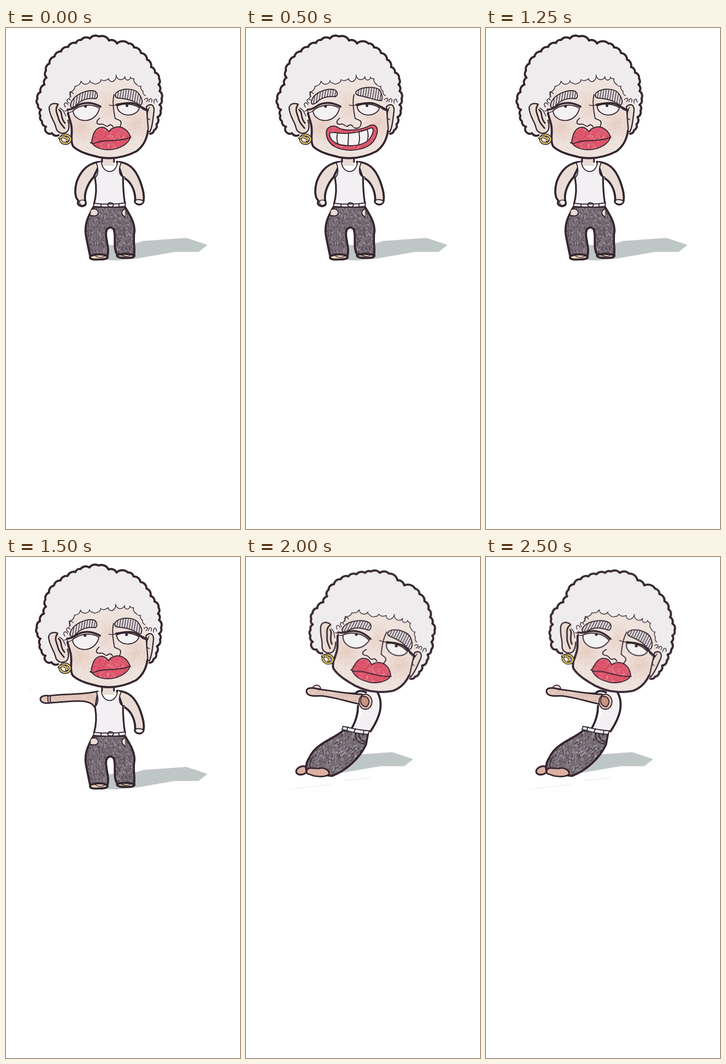
An HTML page for the animation above (2750 ms loop, 468 px wide and 1000 px high).

```html
<!DOCTYPE html>
<html lang="en">
<head>
<meta charset="utf-8">
<title>Cartoon dance</title>
<style>
html, body { margin: 0; width: 100%; height: 100%; overflow: hidden; background: #fff; }
svg { display: block; width: 100%; height: 100%; }
.ink { fill: none; stroke: #35262f; stroke-linecap: round; stroke-linejoin: round; stroke-width: 2; }
.bold { stroke-width: 4.2; }
.fine { stroke-width: 1.5; }
.skin { fill: #e9dcd4; }
.tan { fill: #e0c6ba; }
.foot { fill: #dcb0a3; }
.shirt { fill: #f2f0f2; }
.jeans { fill: #766c74; }
.red { fill: #dc566c; }
.white { fill: #f4f1f2; }
.gold { fill: none; stroke: #e2cb62; stroke-width: 2.6; }

.step { animation: 2750ms step-end infinite; }
#head { animation-name: head; }
#shadow { animation-name: shadow; }
#lips { animation-name: lips; }
#grin { animation-name: grin; }
#browsDown { animation-name: browsDown; }
#browsUp { animation-name: browsUp; }
#upright { animation-name: upright; }
#armDown { animation-name: armDown; }
#armOut { animation-name: armOut; }
#leanNear { animation-name: leanNear; }
#leanFar { animation-name: leanFar; }

@keyframes head {
  0% { transform: none; }
  54.54% { transform: translate(-1px, 0); }
  63.63%, 81.81% { transform: translate(224.5px, 165px) rotate(16.3deg) scale(1, .965) translate(-200.5px, -154px); }
  72.72%, 90.9%, 100% { transform: translate(261px, 164.5px) rotate(17deg) scale(1, .97) translate(-200.5px, -154px); }
}
@keyframes shadow {
  0% { transform: none; }
  63.63%, 81.81% { transform: translate(-32px, -10px); }
  72.72%, 90.9%, 100% { transform: translate(-68.5px, -29.5px); }
}
@keyframes lips { 0%, 45.45% { opacity: 1; } 9.09% { opacity: 0; } 100% { opacity: 1; } }
@keyframes grin { 0%, 45.45% { opacity: 0; } 9.09% { opacity: 1; } 100% { opacity: 0; } }
@keyframes browsDown { 0%, 27.27%, 45.45%, 100% { opacity: 1; } 18.18%, 36.36% { opacity: 0; } }
@keyframes browsUp { 0%, 27.27%, 45.45%, 100% { opacity: 0; } 18.18%, 36.36% { opacity: 1; } }
@keyframes upright { 0% { opacity: 1; } 63.63%, 100% { opacity: 0; } }
@keyframes armDown { 0% { opacity: 1; } 54.54%, 100% { opacity: 0; } }
@keyframes armOut { 0%, 63.63%, 100% { opacity: 0; } 54.54% { opacity: 1; } }
@keyframes leanNear { 0%, 72.72%, 90.9%, 100% { opacity: 0; } 63.63%, 81.81% { opacity: 1; } }
@keyframes leanFar { 0%, 81.81% { opacity: 0; } 72.72%, 90.9%, 100% { opacity: 1; } }
</style>
</head>
<body>
<svg viewBox="0 0 468 1000" preserveAspectRatio="none">
  <defs>
    <pattern id="hatch" width="5" height="6" patternUnits="userSpaceOnUse" patternTransform="rotate(9)">
      <rect width="5" height="6" fill="#e6e1e4"/>
      <path d="M2 0V6" stroke="#35262f" stroke-width="1.5"/>
    </pattern>
    <radialGradient id="blush">
      <stop offset="0" stop-color="#d9a78f" stop-opacity=".36"/>
      <stop offset="1" stop-color="#d9a78f" stop-opacity="0"/>
    </radialGradient>
    <path id="jeans0" d="M175 357C163 378 155 395 161 420C164 435 166 445 168 454L203 455C207 440 200 425 200 410C200 395 216 394 217 408C219 425 215 440 222 452L256 454C259 440 253 425 257 405C257 385 245 370 238 357Z"/>
    <path id="jeans1" d="M181 350C168 376 147 395 145 430L193 448C200 415 231 398 234 374C235 362 234 352 233 349Z"/>
    <path id="jeans2" d="M195 346C172 365 140 372 127 400C119 412 119 422 122 431L172 437C203 425 228 400 240 374L244 352Z"/>
    <path id="lipShape" d="M171 229C174 210 178 199 192 198C200 198 203 204 206 207C210 199 222 196 230 198C240 201 247 210 249 218C245 232 225 243 205 243C190 243 178 238 171 229Z"/>
    <path id="grinShape" d="M161 213C158 196 175 192 186 200C205 208 235 202 249 194C262 191 265 203 261 214C255 235 235 243 210 244C185 244 164 235 161 213Z"/>
    <path id="armShape" d="M184 268C150 276 120 272 86 277C75 275 67 279 69 286C73 293 82 292 90 291L130 288C160 286 174 290 178 302Z"/>
    <path id="armNear" d="M216 276C190 273 150 272 124 273C114 270 104 273 105 280C106 287 117 286 126 285C160 288 185 294 214 300Z"/>
    <path id="armFar" d="M232 274C205 274 175 267 145 264C135 260 122 260 121 267C120 278 135 278 150 277C180 280 205 290 230 294Z"/>
    <clipPath id="jeans0Clip"><use href="#jeans0"/></clipPath>
    <clipPath id="jeans1Clip"><use href="#jeans1"/></clipPath>
    <clipPath id="jeans2Clip"><use href="#jeans2"/></clipPath>
    <clipPath id="lipClip"><use href="#lipShape"/></clipPath>
    <clipPath id="grinClip"><use href="#grinShape"/></clipPath>
    <clipPath id="armClip"><use href="#armShape"/></clipPath>
    <clipPath id="armNearClip"><use href="#armNear"/></clipPath>
    <clipPath id="armFarClip"><use href="#armFar"/></clipPath>
    <clipPath id="faceClip"><path id="faceClipPath"/></clipPath>
  </defs>

  <path id="shadow" class="step" fill="#bfc7c6" d="M200 434L262 429L275 425L361 419L403 433L385 447L338 447L262 460L220 464L195 463Z"/>

  <g id="upright" class="step">
    <path class="skin" d="M192 258H217V275H192Z"/>
    <path class="ink skin bold" d="M222 267C245 268 258 280 268 305C275 325 277 335 275 346C272 354 262 354 258 347C260 330 252 305 233 298Z"/>
    <path class="ink white" d="M260 343C266 342 272 343 275 346C273 353 262 353 258 347Z"/>
    <g id="armDown" class="step">
      <path class="ink skin bold" d="M190 267C165 268 150 285 142 305C137 322 137 338 145 345C140 353 151 358 157 354C162 351 158 346 158 342C157 330 162 312 175 298Z"/>
      <path class="ink fine white" d="M147 347C150 341 158 343 159 349C156 356 148 355 147 347Z"/>
    </g>
    <g id="armOut" class="step">
      <use href="#armShape" class="tan"/>
      <g clip-path="url(#armClip)" data-box="70 268 112 32" data-count="90" data-tilt="-.1" data-tones="#f1e5de #cfa797"></g>
      <use href="#armShape" class="ink" style="stroke-width:3"/>
      <path class="ink" d="M84 277C83 284 84 288 85 291M89 277C88 284 88 288 90 291"/>
      <circle cx="48" cy="265" r=".8" fill="#aaa"/>
    </g>
    <path class="shirt" d="M181 270L191 267C193 290 221 293 223 267L230 270C223 285 228 298 237 297C234 315 235 333 238 351L177 351C181 332 178 315 176 299C185 294 185 282 181 270Z"/>
    <path class="ink" d="M181 270C186 284 184 297 176 299M230 270C223 285 228 298 237 297M191 268C193 291 220 294 223 268"/>
    <path class="ink" style="stroke-width:3.5" d="M178 299C181 315 181 334 176 351M234 298C234 317 235 333 238 351M192 260V267M216 260V267"/>
    <use href="#jeans0" class="jeans"/>
    <g clip-path="url(#jeans0Clip)" data-box="155 355 105 102" data-count="900" data-tilt="1.2" data-tones="#b3a8b0 #463b44 #8f8594 #5b4a52"></g>
    <use href="#jeans0" class="ink bold"/>
    <path class="ink skin" d="M170 363C178 358 186 364 184 371C180 377 174 375 169 374M238 361C230 364 229 372 238 377"/>
    <path class="ink white" d="M176 350C195 352 220 352 239 349L238 356C220 358 195 358 175 356Z"/>
    <path class="ink" d="M190 351V356M226 351V356M203 352C207 346 215 349 215 354C212 359 204 358 203 352"/>
    <path class="ink bold" style="fill:#e6d3b8" d="M169 455C178 451 195 450 203 456C205 461 195 462 185 462C173 463 165 461 169 455ZM222 453C232 450 248 450 257 454C257 459 247 459 239 459C229 459 221 458 222 453Z"/>
    <path class="ink fine" d="M178 454C184 459 192 459 198 455M230 453C237 457 244 457 250 453"/>
  </g>

  <g id="leanNear" class="step">
    <path class="ink skin" style="stroke-width:3" d="M200 267L126 262C116 259 106 260 104 265C104 271 110 272 126 272L205 278Z"/>
    <path class="shirt" d="M200 266L238 268C247 290 246 320 233 348L183 346C198 330 200 315 192 302Z"/>
    <path class="ink bold" d="M238 269C247 290 246 320 234 346M194 299C201 315 194 334 183 346M191 268C202 265 214 266 221 273"/>
    <use href="#armNear" class="tan"/>
    <g clip-path="url(#armNearClip)" data-box="104 270 112 32" data-count="90" data-tilt=".1" data-tones="#f1e5de #c99c8b"></g>
    <use href="#armNear" class="ink" style="stroke-width:3"/>
    <path class="ink fine" d="M122 262C118 267 120 270 123 272M124 273C120 278 122 282 126 285M187 264V273"/>
    <ellipse class="ink" style="fill:#ad705b" cx="218" cy="289" rx="12" ry="14"/>
    <path class="ink" style="fill:#c89480" d="M214 278C222 279 225 290 217 298C208 297 206 284 214 278Z"/>
    <ellipse class="ink foot" style="stroke-width:3" cx="130" cy="436" rx="13" ry="8" transform="rotate(12 130 436)"/>
    <use href="#jeans1" class="jeans"/>
    <g clip-path="url(#jeans1Clip)" data-box="142 348 95 103" data-count="900" data-tilt="1.9" data-tones="#bdb4b9 #41363e #8f98a8 #76585f"></g>
    <use href="#jeans1" class="ink" style="stroke-width:3.5"/>
    <path class="ink" d="M208 354C207 369 216 378 223 378M213 354C213 365 218 371 224 373M182 355C183 374 164 402 157 425"/>
    <path class="ink white" d="M179 344C198 347 218 346 237 347L236 353C218 351 196 352 177 349Z"/>
    <path class="ink" d="M190 344L188 351M204 344L202 351M224 345V352"/>
    <path class="ink foot" style="stroke-width:3" d="M139 439C138 428 152 430 161 434C172 431 183 438 180 446C173 452 156 451 148 446C142 446 139 443 139 439Z"/>
    <path class="ink" style="stroke-width:3" d="M180 450C187 452 193 449 194 445"/>
  </g>

  <g id="leanFar" class="step">
    <path class="ink skin" d="M133 262C136 253 149 254 149 263Z"/>
    <path class="shirt" d="M224 267L262 268C275 290 271 315 249 350L210 344C227 330 232 315 230 300Z"/>
    <path class="ink bold" d="M262 268C275 290 271 315 249 348M224 297C224 315 219 329 212 341M219 273C223 266 232 266 240 270"/>
    <use href="#armFar" class="tan"/>
    <g clip-path="url(#armFarClip)" data-box="120 260 112 36" data-count="90" data-tilt=".2" data-tones="#f1e5de #c99c8b"></g>
    <use href="#armFar" class="ink" style="stroke-width:3.2"/>
    <path class="ink" d="M150 264C180 269 202 273 222 271"/>
    <ellipse class="ink" style="fill:#dbbcae" cx="239" cy="289" rx="13" ry="15"/>
    <path class="ink" style="fill:#c89480" d="M232 278C246 277 250 290 241 299C230 298 226 288 232 278Z"/>
    <ellipse class="ink foot" style="stroke-width:3.5" cx="112" cy="426" rx="12" ry="8" transform="rotate(-18 112 426)"/>
    <use href="#jeans2" class="jeans"/>
    <g clip-path="url(#jeans2Clip)" data-box="115 344 132 97" data-count="1000" data-tilt="2.2" data-tones="#bdb4b9 #382d35 #8f98a8 #76585f"></g>
    <use href="#jeans2" class="ink bold"/>
    <path class="ink" d="M219 349C217 363 225 373 236 373M226 352C226 362 230 367 237 368M134 398C127 407 127 415 129 422"/>
    <path class="ink white" d="M194 338C211 342 230 346 247 347L244 354C227 353 210 350 192 344Z"/>
    <path class="ink" d="M204 339L201 347M219 343L216 350M236 346L234 354"/>
    <path class="ink foot" style="stroke-width:3" d="M121 428C122 417 137 423 146 422C157 419 168 426 166 434C156 441 136 438 128 434C123 434 121 431 121 428Z"/>
    <path fill="none" stroke="#eeeeee" stroke-width="1.5" d="M87 464L170 454M196 446L250 441"/>
  </g>

  <g id="head" class="step">
    <path id="hairFill" fill="#efecee"/>
    <path id="face" fill="#eee2dd"/>
    <g clip-path="url(#faceClip)">
      <ellipse cx="150" cy="198" rx="40" ry="34" fill="url(#blush)"/>
      <ellipse cx="262" cy="190" rx="36" ry="36" fill="url(#blush)"/>
      <ellipse cx="204" cy="155" rx="24" ry="40" fill="url(#blush)" opacity=".7"/>
      <g opacity=".6" data-box="130 170 52 70" data-count="110" data-tilt="1.6" data-tones="#e4c6b7 #f3e9e4"></g>
      <g opacity=".6" data-box="234 165 52 72" data-count="110" data-tilt="1.6" data-tones="#e4c6b7 #f3e9e4"></g>
      <g opacity=".5" data-box="184 116 44 72" data-count="70" data-tilt="1.6" data-tones="#e4c6b7 #f3e9e4"></g>
    </g>
    <path id="hairEdge" class="ink bold"/>
    <path id="hairline" class="ink fine"/>
    <path class="ink bold" d="M124 170C126 180 130 188 131 197C133 211 128 228 135 237C148 249 170 254 187 258C215 263 240 257 261 246C276 235 282 219 284 205"/>

    <path class="skin" d="M104 152C92 148 84 154 87 165C90 180 97 186 100 199C102 209 112 213 121 208C129 203 127 190 122 183C116 176 118 164 110 160Z"/>
    <path class="ink" style="stroke-width:2.5" d="M104 152C92 148 84 154 87 165C90 180 97 186 100 199C102 209 112 213 121 208C127 204 127 192 124 184"/>
    <path class="ink" style="stroke-width:3" d="M104 153C97 162 102 171 104 177C106 190 114 195 117 200M106 163C114 168 108 180 118 190"/>
    <path class="ink fine" d="M108 160C116 163 117 171 120 176M119 158C112 150 121 146 124 153M126 150C119 145 123 138 129 144M130 137C124 132 130 125 135 131M118 166C123 163 127 168 123 172"/>
    <ellipse class="ink" cx="119" cy="222" rx="10" ry="8.5" style="stroke-width:5.6"/>
    <ellipse class="gold" cx="119" cy="222" rx="10" ry="8.5"/>
    <path class="ink" style="stroke-width:5" d="M107 220C115 214 124 219 122 226"/>
    <path class="gold" d="M107 220C115 214 124 219 122 226"/>

    <path class="ink skin" style="stroke-width:2.5" d="M281 157C290 149 297 154 296 166C294 178 294 194 288 207L284 206C285 197 283 190 283 182Z"/>
    <path class="ink fine" d="M287 158C282 166 283 174 282 180L288 183M277 143C283 136 287 143 281 147M286 147C286 138 295 140 291 148M296 150C294 142 302 138 302 148"/>

    <path class="ink white" d="M134 165C136 190 179 194 187 160C170 150 149 153 134 165ZM222 156C225 179 262 179 267 159C250 150 235 150 222 156Z"/>
    <path class="ink" style="stroke-width:3.8" d="M123 163C138 163 142 151 158 150C170 148 180 152 189 157M221 153C229 152 240 148 253 150C266 153 272 160 284 164"/>
    <path class="ink fine" d="M207 154C212 155 217 155 222 153M126 169C131 168 135 165 138 162M268 157C272 162 276 164 280 165"/>
    <circle cx="159" cy="156.500" r="2.800" fill="#35262f"/>
    <circle cx="242" cy="155" r="2.800" fill="#35262f"/>

    <path class="ink" d="M216 133C212 150 216 168 218 180C223 184 232 183 230 191C229 200 222 201 216 199M187 180C179 187 181 193 189 192C196 189 200 201 206 194C210 192 212 194 214 197"/>

    <g id="browsDown" class="step">
      <path class="ink" style="fill:url(#hatch)" d="M129 153C134 132 164 122 178 126C184 130 184 138 180 141C165 139 150 143 141 154C134 161 128 160 129 153ZM220 130C228 120 258 118 267 133C273 142 275 152 268 154C258 148 250 142 226 140C218 140 217 134 220 130Z"/>
    </g>
    <g id="browsUp" class="step">
      <path class="ink" style="fill:url(#hatch)" d="M131 147C133 130 160 120 177 123C184 127 184 134 179 137C165 136 150 138 141 149C134 154 130 152 131 147ZM221 126C232 117 256 116 267 123C272 131 274 141 271 145C258 145 245 138 227 135C219 133 218 130 221 126Z"/>
    </g>

    <g id="lips" class="step">
      <use href="#lipShape" class="red"/>
      <g clip-path="url(#lipClip)" data-box="170 197 80 47" data-count="200" data-tilt="2.3" data-tones="#ec98a5 #cc3d57 #e26f82"></g>
      <use href="#lipShape" class="ink"/>
      <path class="ink" d="M169 229C177 233 182 227 191 226C211 224 232 225 250 218"/>
    </g>
    <g id="grin" class="step">
      <use href="#grinShape" class="red"/>
      <g clip-path="url(#grinClip)" data-box="159 192 104 53" data-count="200" data-tilt="2.3" data-tones="#ec98a5 #cc3d57 #e26f82"></g>
      <use href="#grinShape" class="ink"/>
      <path class="ink white" d="M167 212C167 206 178 209 188 210C210 212 235 206 248 200C255 198 256 204 252 213C246 228 230 235 207 235C185 235 169 228 167 212Z"/>
      <path class="ink" d="M183 210C181 219 182 226 184 231M205 211L204 235M226 207C227 217 228 225 225 232M242 202C245 210 245 216 243 223"/>
    </g>
  </g>
</svg>
<script>
const el = id => document.getElementById(id);

// Chain of round bumps through the given points; a larger bend is flatter.
function bumps(list, sweep, bend) {
  const n = list.split(" ").map(Number);
  let d = `M${n[0]} ${n[1]}`;
  for (let i = 2; i < n.length; i += 2) {
    const r = Math.hypot(n[i] - n[i - 2], n[i + 1] - n[i - 1]) * bend;
    d += `A${r} ${r} 0 0 ${sweep} ${n[i]} ${n[i + 1]}`;
  }
  return d;
}

const hair = bumps("105 214 92 210 80 207 80 197 72 186 69 175 70 163 64 153 63 141 69 128 77 113 " +
  "81 99 80 85 87 71 97 57 110 47 124 38 140 30 150 24 168 21 186 17 206 25 222 31 245 31 " +
  "256 39 270 50 282 63 290 78 298 89 306 101 305 113 307 126 311 141 307 153 309 165 " +
  "303 178 301 192 296 204 288 211", 1, 0.72);
const hairline = bumps("126 141 127 128 138 116 150 106 160 112 168 105 174 110 184 110 190 103 " +
  "205 101 213 107 220 94 229 103 238 97 243 104 249 98 256 101 262 113 270 116 274 126 279 135", 0, 0.75);
const face = hairline + "L286 152L288 207L284 207C282 221 276 235 261 246C240 257 215 263 187 258" +
  "C170 254 148 249 135 237C128 228 133 211 129 195L120 165Z";

el("hairEdge").setAttribute("d", hair);
el("hairFill").setAttribute("d", hair + "L260 240L140 235Z");
el("hairline").setAttribute("d", hairline);
el("face").setAttribute("d", face);
el("faceClipPath").setAttribute("d", face);

// Seeded pencil strokes inside each shaded area.
let seed = 7;
const rnd = () => (seed = seed * 16807 % 2147483647) / 2147483647;

for (const g of document.querySelectorAll("[data-box]")) {
  const [x, y, w, h] = g.dataset.box.split(" ").map(Number);
  const tones = g.dataset.tones.split(" ");
  const paths = tones.map(() => "");
  for (let i = 0; i < g.dataset.count; i++) {
    const a = +g.dataset.tilt + (rnd() - 0.5) * 0.9;
    const len = 1.5 + rnd() * 4;
    paths[i % tones.length] += `M${(x + rnd() * w).toFixed(1)} ${(y + rnd() * h).toFixed(1)}` +
      `l${(Math.cos(a) * len).toFixed(1)} ${(Math.sin(a) * len).toFixed(1)}`;
  }
  g.innerHTML = paths.map((d, i) =>
    `<path d="${d}" fill="none" stroke="${tones[i]}" stroke-width="1.2"/>`).join("");
}
</script>
</body>
</html>
```
